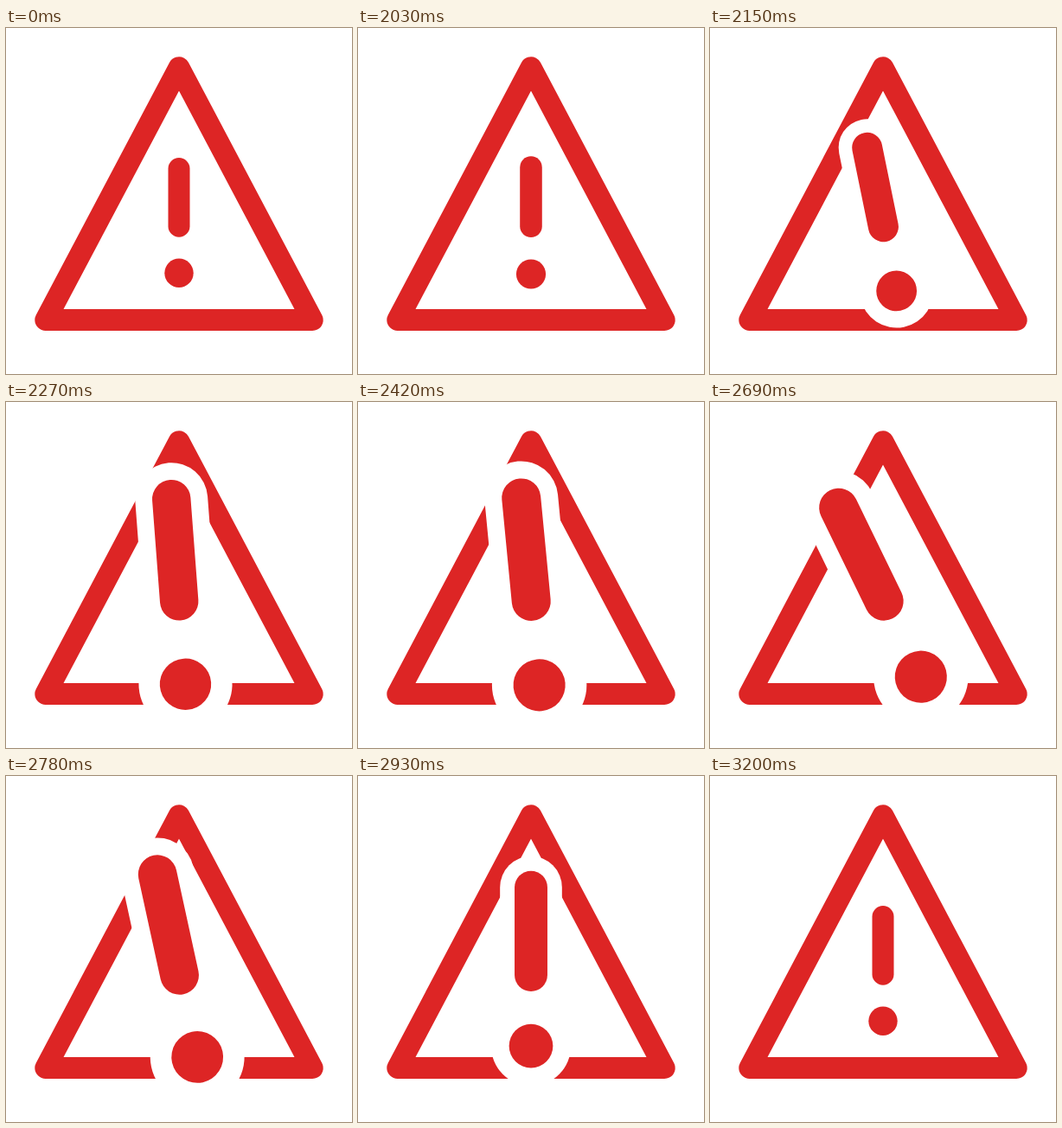
An HTML page for the animation above (3.23 s loop, 400 px wide and 400 px high).

```html
<!DOCTYPE html>
<html lang="en">
<head>
<meta charset="utf-8">
<title>Warning</title>
<style>
  html, body { margin: 0; height: 100%; overflow: hidden; background: #fff; }
  svg { display: block; width: 100vw; height: 100vh; }
  path { fill: none; stroke-linecap: round; stroke-linejoin: round; }
  .red { stroke: #dd2525; }
  .halo { stroke: #fff; }
</style>
</head>
<body>
<svg viewBox="0 0 400 400">
  <path class="red" stroke-width="25" d="M200 45.8L354.2 337.5H45.8Z"/>
  <g id="mark">
    <path class="halo" stroke-width="47.2" d="M200 162.5V229.2"/>
    <path class="halo" stroke-width="60.8" d="M200 283.3h.01"/>
    <path class="red" stroke-width="25" d="M200 162.5V229.2"/>
    <path class="red" stroke-width="33.4" d="M200 283.3h.01"/>
  </g>
</svg>
<script>
const LOOP = 3230, REST = 2000, STEP = 30;
const PIVOT_Y = 227.7;

// Keys are [step, value]
const scaleKeys = [[0, 1], [10, 1.8], [25, 1.8], [40, 1]];
const angleKeys = [[1, 0], [5.5, -12], [11.4, 0], [20.9, -30], [30, 0]];

const ease = t => t * t * (3 - 2 * t);

function valueAt(keys, step) {
  if (step <= keys[0][0]) return keys[0][1];
  for (let i = 1; i < keys.length; i++) {
    const [start, from] = keys[i - 1], [end, to] = keys[i];
    if (step <= end) return from + (to - from) * ease((step - start) / (end - start));
  }
  return keys[keys.length - 1][1];
}

const mark = document.getElementById('mark');
const startTime = performance.now();

function draw() {
  const time = (performance.now() - startTime) % LOOP;
  const step = Math.max(0, Math.floor((time - REST) / STEP));
  const scale = valueAt(scaleKeys, step), angle = valueAt(angleKeys, step);
  mark.setAttribute('transform',
    `translate(200 ${PIVOT_Y}) rotate(${angle}) scale(${scale}) translate(-200 ${-PIVOT_Y})`);
  requestAnimationFrame(draw);
}
draw();
</script>
</body>
</html>
```
